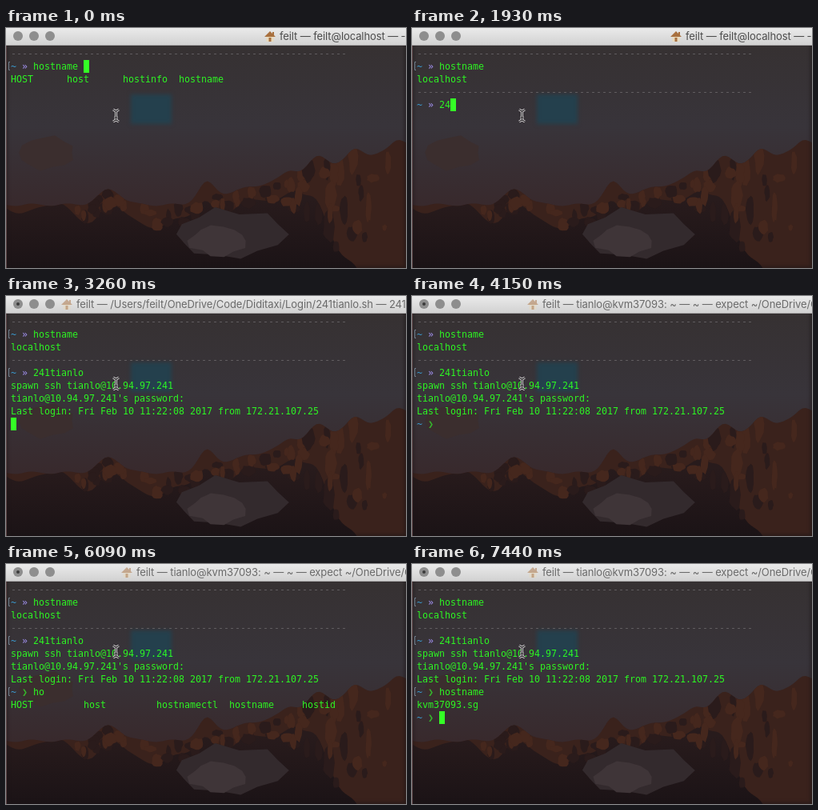
These frames come from a looping animation (500 by 300 pixels, 8 s). An HTML page with a canvas:

```html
<!DOCTYPE html>
<html lang="en">
<head>
<meta charset="utf-8">
<title>Terminal login</title>
<style>
html, body { margin: 0; width: 500px; height: 300px; overflow: hidden; background: #2b2426; }
canvas { display: block; }
</style>
</head>
<body>
<canvas id="stage" width="500" height="300"></canvas>
<script>
const LOOP = 8000, COL = 7, ROW = 16, LEFT = 6, TOP = 24;
const MONO = '11.63px "DejaVu Sans Mono", monospace';
const GREEN = '#2df423', BLUE = '#3b9bd0', PURPLE = '#a493f4', DIM = '#615d60';
const RULE = '-'.repeat(60);
const HOST_LIST = ['HOST', 'host', 'hostnamectl', 'hostname', 'hostid'].map(s => s.padEnd(13)).join('');

const localKeys = [[440, ''], [1930, '24'], [2080, '241'], [2380, '241t'], [2670, '241tianlo ']];
const remoteKeys = [[3400, ''], [4890, 'ho'], [6390, 'hos'], [6540, 'host'], [7140, 'hostn'], [7290, 'hostname']];
const cursorOff = [[1190, 1640], [3110, 3260], [4150, 4590], [6090, 6390]];
// start, icon x, icon opacity, text
const titles = [
  [0, 323, 1, 'feilt — feilt@localhost — -zsh'],
  [3110, 69, 0.5, 'feilt — /Users/feilt/OneDrive/Code/Diditaxi/Login/241tianlo.sh — 241tianlo'],
  [3400, 144, 0.5, 'feilt — tianlo@kvm37093: ~ — ~ — expect ~/OneDrive/Code']
];
// peaks of the ridge: x, height, width
const peaks = [[130, 19, 20], [250, 20, 14], [355, 8, 12], [390, 16, 16], [437, 13, 14], [490, 12, 12]];

const ctx = document.getElementById('stage').getContext('2d');
const latest = (list, t) => list.filter(e => e[0] <= t).pop();
const within = (t, [a, b]) => t >= a && t < b;
const clamp = v => Math.min(1, Math.max(0, v));

let seed = 11;
function random(a = 0, b = 1) {
  seed = (seed * 16807) % 2147483647;
  return a + (b - a) * seed / 2147483647;
}

function ridge(x) {
  const slope = 221 - Math.max(0, x - 220) * 0.26 + 1.5 * Math.sin(x / 7);
  return peaks.reduce((y, [px, h, w]) => y - h * Math.exp(-(((x - px) / w) ** 2)), slope);
}
// the lit rock reaches further down towards the right
const ground = x => ridge(x) + 4 + 18 * clamp((x - 70) / 40) + 6 * Math.sin(x / 13) + 150 * clamp((x - 365) / 90);

function below(edge) {
  const path = new Path2D();
  for (let x = 0; x <= 500; x += 4) path.lineTo(x, edge(x));
  path.lineTo(500, 300);
  path.lineTo(0, 300);
  return path;
}

function blob(c, color, x, y, rx, ry) {
  c.fillStyle = color;
  c.beginPath();
  for (let a = 0; a < 6.28; a += 0.45) {
    const r = random(0.8, 1.1);
    c.lineTo(x + rx * r * Math.cos(a), y + ry * r * Math.sin(a));
  }
  c.fill();
}

function disc(c, color, x, y, r) {
  c.fillStyle = color;
  c.beginPath();
  c.arc(x, y, r, 0, 7);
  c.fill();
}

function gradient(c, y0, y1, ...colors) {
  const g = c.createLinearGradient(0, y0, 0, y1);
  colors.forEach((color, i) => g.addColorStop(i / (colors.length - 1), color));
  return g;
}

function paintMountains(c) {
  const mountains = below(ridge);
  c.save();
  c.filter = 'blur(0.7px)';
  c.fillStyle = '#3a221c';
  c.fill(mountains);
  c.clip(mountains);
  c.fillStyle = gradient(c, 215, 300, '#281b1c', '#1b1316');
  c.fill(below(ground));
  for (let i = 0; i < 70; i++) {
    const x = random(85, 500), right = clamp((x - 340) / 80);
    const y = ridge(x) + random(4, 24 + 100 * right);
    const color = i % 2 ? '#45271d' : '#2a1b1b';
    blob(c, color, x, y, random(3, 9), random(4, 10 + 18 * right));
  }
  blob(c, '#332a2d', 278, 258, 72, 32);
  blob(c, '#3f3538', 264, 266, 36, 19);
  c.restore();
}

function paintBackdrop() {
  const layer = document.createElement('canvas');
  layer.width = 500;
  layer.height = 300;
  const c = layer.getContext('2d');
  c.fillStyle = gradient(c, 21, 225, '#363132', '#38343a', '#38292c');
  c.fillRect(0, 0, 500, 300);
  blob(c, '#3b2e2e', 52, 156, 38, 22);
  c.filter = 'blur(2.5px)';
  c.fillStyle = '#24404d';
  c.fillRect(156, 83, 51, 37);
  c.filter = 'none';
  paintMountains(c);

  c.filter = 'blur(2px)';
  c.strokeStyle = '#1a141799';
  c.lineWidth = 4;
  c.strokeRect(0, 10, 500, 290);
  c.filter = 'none';
  c.fillStyle = '#60484a';
  c.fillRect(0, 21, 1, 279);

  c.fillStyle = gradient(c, 0, 21, '#eaeaea', '#d2d2d2');
  c.fillRect(0, 0, 500, 21);
  c.fillStyle = '#aaa8a9';
  c.fillRect(0, 21, 500, 1);
  for (const x of [15, 35, 55]) disc(c, '#8e8e8e', x, 10, 6);
  return layer;
}

function drawTitle(t) {
  const [, x, alpha, label] = latest(titles, t);
  if (t >= 3110) disc(ctx, '#3c3c3c', 15, 10, 2);
  ctx.save();
  ctx.globalAlpha = alpha;
  ctx.translate(x, 3);
  ctx.fillStyle = '#e8d9bd';
  ctx.fillRect(2.5, 7, 9, 7);
  ctx.fillStyle = '#a8703f';
  ctx.fill(new Path2D('M0 8 L7 1 L14 8 Z M10 2 H12 V6 H10 Z M5.5 9 H8.5 V14 H5.5 Z'));
  ctx.restore();
  ctx.font = '13px Inter, sans-serif';
  ctx.letterSpacing = '-0.1px';
  ctx.fillStyle = alpha < 1 ? '#6a6a6a' : '#4c4c4c';
  ctx.fillText(label, x + 19, 15);
  ctx.letterSpacing = '0px';
}

function text(row, col, str, color = GREEN, weight = '') {
  ctx.font = `${weight} ${MONO}`;
  ctx.fillStyle = color;
  ctx.fillText(str, LEFT + col * COL, TOP + row * ROW + 12);
}

function prompt(row, command, mark, bracket) {
  const y = TOP + row * ROW;
  text(row, 0, '~', BLUE);
  if (mark === '»') text(row, 2, mark, PURPLE);
  else text(row, 2, mark, '#35b82c', 'bold');
  text(row, 4, command);
  if (!bracket) return;
  ctx.strokeStyle = '#71808f';
  ctx.lineWidth = 1;
  ctx.stroke(new Path2D(`M5 ${y + 2.5} H3.5 V${y + 12.5} H5`));
}

function drawTerminal(t) {
  let row = 1, col = 13;
  text(0, 0, RULE, DIM);
  prompt(1, 'hostname', '»', true);
  if (t < 440) {
    text(2, 0, 'HOST      host      hostinfo  hostname');
  } else {
    const command = latest(localKeys, t)[1];
    text(2, 0, 'localhost');
    text(3, 0, RULE, DIM);
    prompt(4, command, '»', t >= 2670);
    [row, col] = [4, 4 + command.length];
  }
  if (t >= 3110) text(5, 0, 'spawn ssh tianlo@10.94.97.241');
  if (t >= 3260) {
    text(6, 0, "tianlo@10.94.97.241's password:");
    text(7, 0, 'Last login: Fri Feb 10 11:22:08 2017 from 172.21.107.25');
    [row, col] = [8, 0];
  }
  if (t >= 3400) {
    const command = latest(remoteKeys, t)[1];
    prompt(8, command, '❯', t >= 5040);
    col = 4 + command.length;
  }
  if (within(t, [5190, 6540])) text(9, 0, HOST_LIST);
  if (t >= 7440) {
    text(9, 0, 'kvm37093.sg');
    prompt(10, '', '❯', false);
    [row, col] = [10, 4];
  }
  if (!cursorOff.some(span => within(t, span))) {
    ctx.fillStyle = '#34ff26';
    ctx.fillRect(LEFT + col * COL, TOP + row * ROW, COL, ROW);
  }
}

function drawPointer() {
  const beam = new Path2D('M134 102 L137.5 104 L141 102 M137.5 104 V115 M134 117 L137.5 115 L141 117 M135.5 112 H139.5');
  for (const [color, width] of [['#e4e2e4', 3], ['#242124', 1.2]]) {
    ctx.strokeStyle = color;
    ctx.lineWidth = width;
    ctx.stroke(beam);
  }
}

const backdrop = paintBackdrop();
const start = performance.now();

function frame() {
  const t = (performance.now() - start) % LOOP;
  ctx.drawImage(backdrop, 0, 0);
  drawTitle(t);
  drawTerminal(t);
  drawPointer();
  requestAnimationFrame(frame);
}
frame();
</script>
</body>
</html>
```
